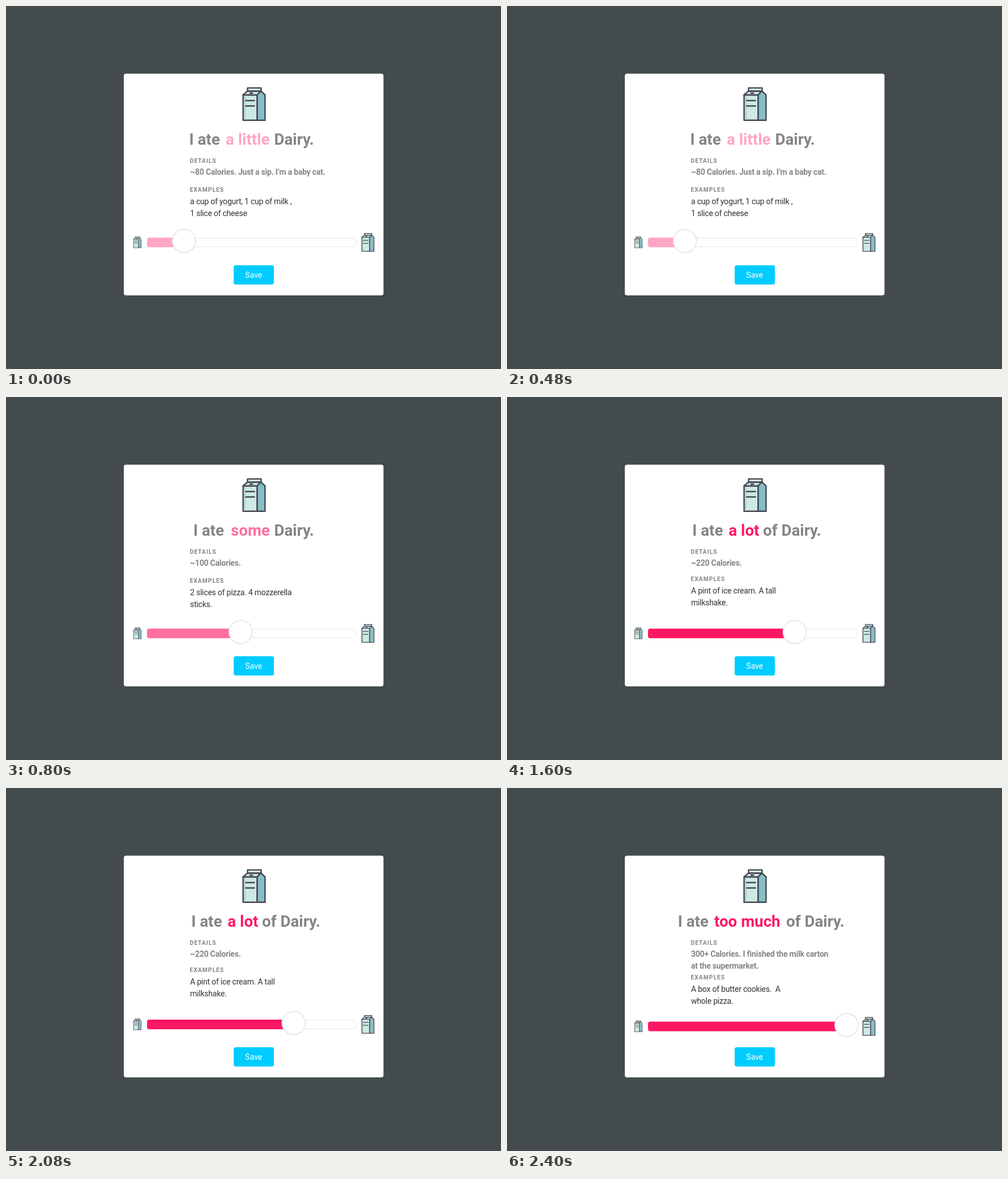
Write an HTML page that moves like this. It is 874 px wide and 641 px high and loops after 3.2 s.

```html
<!DOCTYPE html>
<html lang="en">
<head>
<meta charset="utf-8">
<title>Dairy slider</title>
<style>
  html, body { margin: 0; width: 100%; height: 100%; overflow: hidden; background: #434b4d; }
  svg { display: block; width: 874px; height: 641px; font-family: Roboto, sans-serif; }
  text { white-space: pre; }
  .title { font-size: 27.7px; font-weight: 700; fill: #858585; }
  .label { font-size: 10.3px; font-weight: 700; letter-spacing: 1px; fill: #858585; }
  .details, .examples { font-size: 14px; letter-spacing: -.22px; }
  .details { font-weight: 700; fill: #858585; }
  .examples { fill: #333; }
</style>
</head>
<body>
<svg viewBox="0 0 874 641">
  <defs>
    <g id="carton" stroke="#474352" stroke-width="2.4" stroke-linejoin="round" stroke-linecap="round">
      <path d="M1.6 14H26.5V58.8H1.6Z" fill="#cdeae2"/>
      <path d="M3 15.2H6V57.5H3Z" fill="#b3d3d1" stroke="none"/>
      <path d="M9.5 7.2H33L26.5 14H1.6Z" fill="#cdeae2"/>
      <path d="M33 7.2L40.4 14V58.8H26.5V14Z" fill="#85bfc6"/>
      <path d="M9.5 1.6H33.5V7.2H9.5Z" fill="#cdeae2"/>
      <path d="M13.8 11H18.2M6.3 24H21.5M6.3 33.5H21.5" fill="none"/>
    </g>
  </defs>
  <rect width="874" height="641" fill="#434b4d"/>
  <rect x="208" y="119.5" width="458.5" height="391.5" rx="4" fill="#fff"/>
  <use href="#carton" x="417" y="143"/>

  <g class="title">
    <text id="subject" y="245">I ate</text>
    <text id="amount" y="245"></text>
    <text id="object" y="245"></text>
  </g>
  <text class="label" x="324.5" y="277.3">DETAILS</text>
  <g id="details" class="details"></g>
  <text id="examplesLabel" class="label" x="324.5">EXAMPLES</text>
  <g id="examples" class="examples"></g>

  <g id="slider">
    <use href="#carton" transform="translate(225 407) scale(.34)"/>
    <use href="#carton" transform="translate(627.5 400.7) scale(.55)"/>
    <rect x="250" y="410" width="367.5" height="15" rx="4" fill="#fff" stroke="#f1f1f1" stroke-width="2"/>
    <rect id="fill" x="249" y="409" height="17" rx="4"/>
    <circle id="knob" cy="415" r="20.4" fill="#fff" stroke="#e9e9e9" stroke-width="2"/>
  </g>

  <rect x="402" y="457.7" width="71" height="34" rx="3.5" fill="#0cf"/>
  <text x="437.3" y="480" font-size="14" fill="#fff" text-anchor="middle">Save</text>
</svg>
<script>
  const STEP = 800;
  const LINE = 20.5;
  const steps = [
    { amount: "a little", object: "Dairy.", x: [323.5, 388, 473.5], color: "#ffa5c5", knob: 314.3,
      details: ["~80 Calories. Just a sip. I’m a baby cat."],
      examples: ["a cup of yogurt, 1 cup of milk ,", "1 slice of cheese"], examplesY: 328, shift: 0 },
    { amount: "some", object: "Dairy.", x: [330.8, 397, 473.5], color: "#ff6f9f", knob: 414.3,
      details: ["~100 Calories."],
      examples: ["2 slices of pizza. 4 mozzerella", "sticks."], examplesY: 328, shift: 0 },
    { amount: "a lot", object: "of Dairy.", x: [327.3, 391.3, 452], color: "#ff1762", knob: 508,
      details: ["~220 Calories."],
      examples: ["A pint of ice cream. A tall", "milkshake."], examplesY: 325.4, shift: 0 },
    { amount: "too much", object: "of Dairy.", x: [301.7, 366, 493], color: "#ff1762", knob: 599.5,
      details: ["300+ Calories. I finished the milk carton", "at the supermarket."],
      examples: ["A box of butter cookies.  A", "whole pizza."], examplesY: 338.2, shift: 3.5 }
  ];

  const el = id => document.getElementById(id);
  const set = (id, attrs) => {
    for (const name in attrs) el(id).setAttribute(name, attrs[name]);
  };
  const setLines = (id, lines, y) => {
    el(id).innerHTML = lines.map((line, i) =>
      `<text x="325" y="${y + i * LINE}">${line}</text>`).join("");
  };

  function show(s) {
    ["subject", "amount", "object"].forEach((id, i) => set(id, { x: s.x[i] }));
    el("amount").textContent = s.amount;
    el("object").textContent = s.object;
    set("amount", { fill: s.color });
    setLines("details", s.details, 298);
    set("examplesLabel", { y: s.examplesY });
    setLines("examples", s.examples, s.examplesY + 22);
    set("slider", { transform: `translate(0 ${s.shift})` });
    set("fill", { width: s.knob - 249, fill: s.color });
    set("knob", { cx: s.knob });
  }

  let current = -1;
  function tick() {
    const index = Math.floor(performance.now() / STEP) % steps.length;
    if (index !== current) show(steps[current = index]);
    requestAnimationFrame(tick);
  }
  tick();
</script>
</body>
</html>
```
